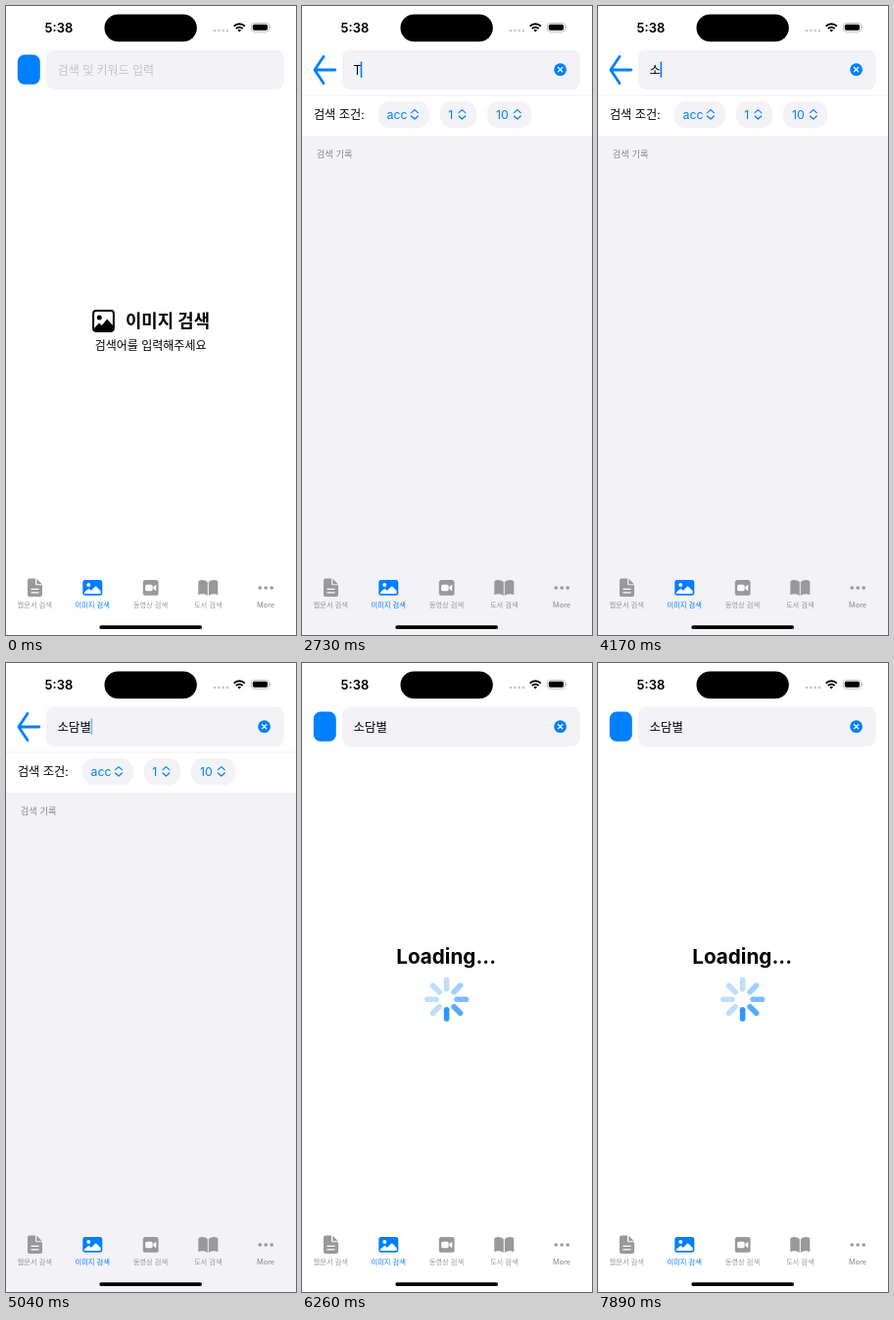
Animation of 296x640 px, one loop 7.99 s. Source, as an HTML page:

```html
<!DOCTYPE html>
<html lang="ko">
<head>
<meta charset="utf-8">
<title>이미지 검색</title>
<style>
html, body { margin: 0; width: 100%; height: 100%; overflow: hidden; background: #fff; }
svg { display: block; width: 100%; height: 100%; }
text { font-family: Inter, "Noto Sans CJK KR", "Noto Sans CJK", sans-serif; font-size: 12px; }
.mid { text-anchor: middle; }
.blue { fill: #007fff; }
.line { fill: none; stroke: #007fff; stroke-linecap: round; stroke-linejoin: round; }
.soft { fill: #f2f2f7; }
.tabs { fill: #999; }
.tabs text { font-size: 7.3px; font-weight: 500; text-anchor: middle; }
</style>
</head>
<body>
<svg viewBox="0 0 296 640">
  <rect width="296" height="640" fill="#fff"/>

  <g id="searchPage">
    <rect class="soft" y="132" width="296" height="508"/>
    <path d="M0 91H296" stroke="#f0f0f3"/>
    <path class="line" stroke-width="2.8" d="M22 51.5L12.9 65L22 78.5M13.5 65H33.8"/>
    <text x="11.9" y="114.5" style="font-size:12.2px">검색 조건:</text>
    <g id="pills"></g>
    <text x="14.7" y="154.4" fill="#8a8a8e" style="font-size:9.3px">검색 기록</text>
  </g>

  <rect id="badge" class="blue" x="11.8" y="49.6" width="23" height="30.2" rx="7"/>

  <g id="intro">
    <rect x="89.1" y="310.1" width="20.8" height="20.8" rx="2.8" fill="none" stroke="#000" stroke-width="2"/>
    <circle cx="95.3" cy="317" r="2.5"/>
    <path d="M90 328L95 322.6L97.8 325L103.2 318.6L109.5 325.6V330.5H90Z"/>
    <text x="122" y="326.7" font-weight="700" style="font-size:17.8px">이미지 검색</text>
    <text class="mid" x="147.6" y="350">검색어를 입력해주세요</text>
  </g>

  <g id="loading">
    <text class="mid" x="147.2" y="306" font-weight="700" style="font-size:20.7px">Loading...</text>
    <g id="spinner" class="line" stroke-width="5.6" transform="translate(147.6 342.2)"></g>
  </g>

  <rect class="soft" x="41" y="44.5" width="242.5" height="40.5" rx="7.5"/>
  <text id="hint" x="52.7" y="69.5" fill="#c4c4c8">검색 및 키워드 입력</text>
  <text id="query" x="52.6" y="69.5" style="font-size:12.4px"></text>
  <rect id="caret" class="blue" y="56.5" width="1.6" height="16.5" rx=".8"/>
  <g id="clear">
    <circle class="blue" cx="263.6" cy="64.7" r="6.4"/>
    <path d="M261.4 62.5l4.4 4.4m0-4.4l-4.4 4.4" stroke="#fff" stroke-width="1.2" stroke-linecap="round"/>
  </g>

  <g id="popup">
    <rect x="92" y="282" width="111.5" height="75.5" rx="5" fill="#fff" stroke="#c9c9cd" stroke-width=".8"/>
    <path class="blue" d="M92 320H203.5V352.5a5 5 0 0 1-5 5H97a5 5 0 0 1-5-5Z"/>
    <text class="mid" x="147.6" y="306" style="font-size:12.8px">English (US)</text>
    <text class="mid" x="147.4" y="344" fill="#fff" style="font-size:13.3px">한국어</text>
  </g>

  <g id="status">
    <text x="39.6" y="26.6" font-weight="600" style="font-size:13px">5:38</text>
    <rect x="100.5" y="8.5" width="94.3" height="27.7" rx="13.85"/>
    <g fill="#c6c6c8">
      <circle cx="213" cy="25" r="1.3"/><circle cx="217.3" cy="25" r="1.3"/>
      <circle cx="221.6" cy="25" r="1.3"/><circle cx="225.9" cy="25" r="1.3"/>
    </g>
    <g fill="none" stroke="#000" stroke-width="1.8">
      <path d="M232.6 20.6a7.9 7.9 0 0 1 11.2 0"/>
      <path d="M234.8 23a4.8 4.8 0 0 1 6.8 0"/>
    </g>
    <path d="M236.4 24.6a2.5 2.5 0 0 1 3.6 0L238.2 26.6Z"/>
    <rect x="250.4" y="17.4" width="18" height="8.8" rx="2.8" fill="none" stroke="#aaa" stroke-width=".8"/>
    <rect x="251.8" y="18.8" width="15.2" height="6" rx="1.7"/>
    <path d="M269.4 20.4a1.5 1.5 0 0 1 0 2.8Z" fill="#aaa"/>
  </g>

  <g class="tabs">
    <path d="M24 582.5h6v5.3a1.5 1.5 0 0 0 1.5 1.5H37v9.7a2 2 0 0 1-2 2H24a2 2 0 0 1-2-2V584.5a2 2 0 0 1 2-2ZM31.3 582.7L36.8 588.2H32a.7.7 0 0 1-.7-.7Z"/>
    <path d="M25.5 593.3h8m-8 3.6h8" stroke="#fff" stroke-width="1.2"/>
    <text x="29.3" y="611.5">웹문서 검색</text>
    <g class="blue">
      <rect x="78.3" y="584" width="20" height="15.8" rx="2.4"/>
      <circle cx="84.3" cy="589" r="1.9" fill="#fff"/>
      <path d="M80 598V596.4L84.3 592.8L86.8 594.8L91.8 590.2L96.6 595V598Z" fill="#fff"/>
      <text x="88.2" y="611.5">이미지 검색</text>
    </g>
    <rect x="139.8" y="584" width="15.8" height="15.8" rx="2.6"/>
    <rect x="142.2" y="588.7" width="7.4" height="6.5" rx="1.5" fill="#fff"/>
    <path d="M150.3 591L153.3 588.8V595.2L150.3 593Z" fill="#fff"/>
    <text x="147.4" y="611.5">동영상 검색</text>
    <path d="M205.8 586.2C203.2 583.6 199 583.5 196.3 585.3V599.2C199 597.7 203 597.8 205.8 600ZM206.8 586.2C209.4 583.6 213.6 583.5 216.3 585.3V599.2C213.6 597.7 209.6 597.8 206.8 600Z"/>
    <text x="206.3" y="611.5">도서 검색</text>
    <circle cx="259.2" cy="592" r="1.8"/><circle cx="265.2" cy="592" r="1.8"/><circle cx="271.2" cy="592" r="1.8"/>
    <text x="265.1" y="611.5">More</text>
  </g>
  <rect x="95.3" y="630.2" width="104.8" height="3.8" rx="1.9"/>
</svg>
<script>
const LOOP = 7990;
const OPEN = 890, LOAD = 5570;
const SPOKE_ALPHA = [0.82, 0.66, 0.52, 0.38];
const IDLE_ALPHA = 0.26;
const STEP = 100;

const el = id => document.getElementById(id);
const show = (id, alpha) => el(id).setAttribute('opacity', Number(alpha));

// [start, text, caret x]
const typing = [
  [0, '', 52.8], [2730, 'T', 59.7], [3190, '', 52.8], [4060, 'ㅅ', 63.6],
  [4170, '소', 63.6], [4280, '소다', 75], [4410, '소담벼', 86.6], [4530, '소담별', 86.6]
];
// [start, opacity]
const caretAlpha = [
  [0, 0], [OPEN, 1], [1590, 0.5], [1700, 0], [2490, 0.5], [2610, 1],
  [5040, 0.5], [5160, 0], [LOAD, 0]
];
const popupAlpha = [[0, 0], [3520, 1], [3720, 0.4], [3830, 0]];

const at = (keys, t) => keys.filter(k => k[0] <= t).pop();

function pill(x, width, label, textX, arrowX) {
  return `<rect class="soft" x="${x}" y="97" width="${width}" height="27" rx="11.5"/>
    <text class="blue" x="${textX}" y="114.8" style="font-size:12.3px">${label}</text>
    <path class="line" stroke-width="1.2" d="M${arrowX - 3.4} 108.6l3.4-3l3.4 3m-6.8 3.4l3.4 3l3.4-3"/>`;
}

el('pills').innerHTML =
  pill(78, 52, 'acc', 86.6, 115) +
  pill(141, 37, '1', 149.2, 163.4) +
  pill(189, 45, '10', 197.9, 219.8);

const spokes = Array.from({ length: 8 }, (_, i) => {
  const p = document.createElementNS('http://www.w3.org/2000/svg', 'path');
  p.setAttribute('d', 'M0 -10.6V-19.8');
  p.setAttribute('transform', `rotate(${i * 45})`);
  el('spinner').append(p);
  return p;
});

function spin(t) {
  const head = Math.floor((t - 5690) / STEP + 0.5) + 6;
  spokes.forEach((p, i) => {
    const age = (((head - i) % 8) + 8) % 8;
    p.setAttribute('opacity', SPOKE_ALPHA[age] ?? IDLE_ALPHA);
  });
}

function render(t) {
  const searching = t >= OPEN && t < LOAD;
  const [, text, caretX] = at(typing, t);
  show('searchPage', searching);
  show('badge', !searching);
  show('intro', t < OPEN);
  show('loading', t >= LOAD);
  show('hint', !text);
  show('clear', !!text);
  show('popup', at(popupAlpha, t)[1]);
  show('caret', at(caretAlpha, t)[1]);
  el('caret').setAttribute('x', caretX);
  el('query').textContent = text;
  spin(t);
}

function tick() {
  render(performance.now() % LOOP);
  requestAnimationFrame(tick);
}
tick();
</script>
</body>
</html>
```
